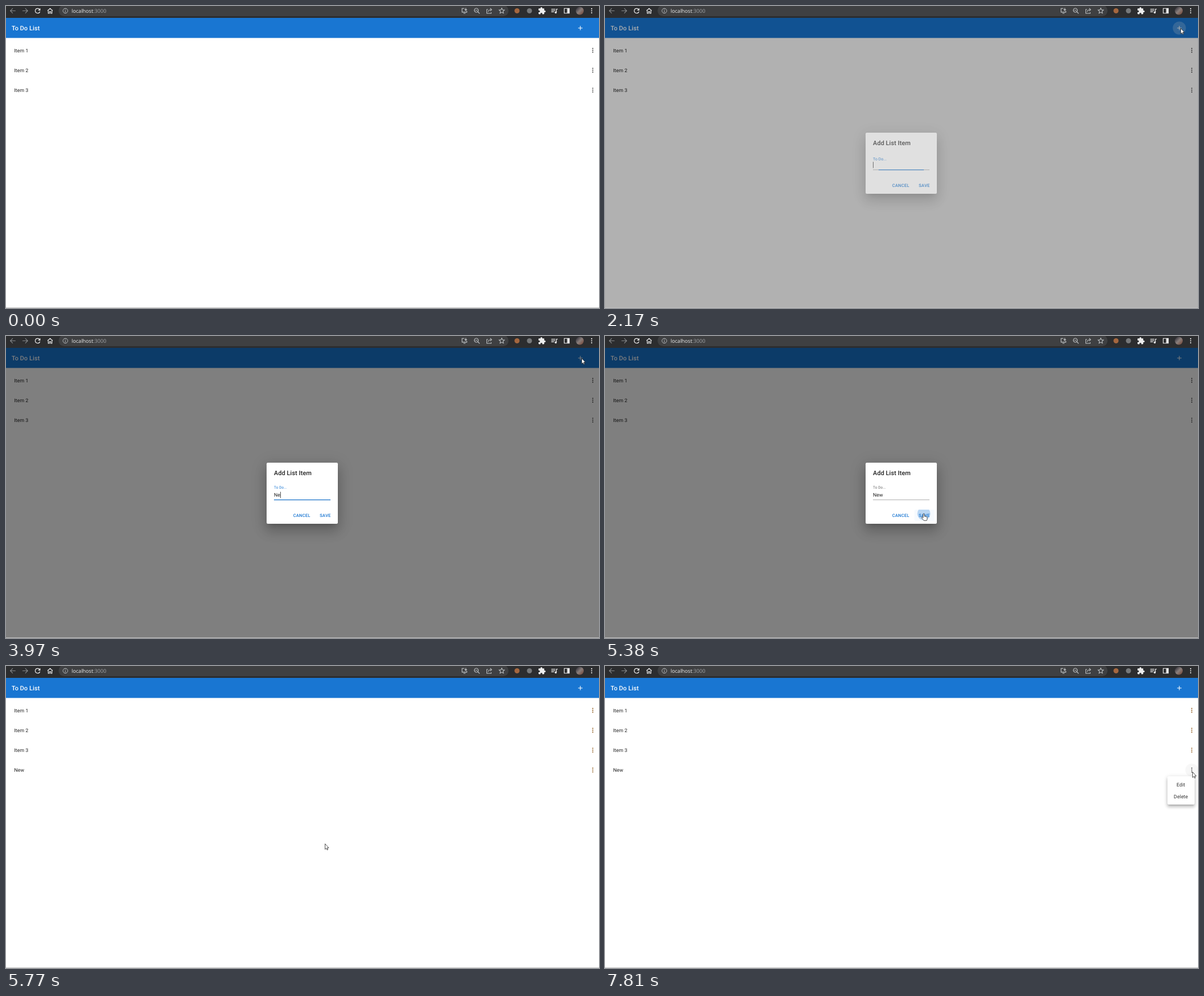
Recreate the animation shown at these times as an HTML page. Size 1049 by 534 pixels, loop 7.99 s.

```html
<!DOCTYPE html>
<html lang="en">
<head>
<meta charset="utf-8">
<title>To Do List</title>
<style>
html, body { margin: 0; width: 100%; height: 100%; overflow: hidden; background: #fff; }
body > * { position: absolute; }
svg { display: block; left: 0; top: 0; overflow: visible; }
text { font-family: Roboto, sans-serif; font-size: 8.8px; letter-spacing: .009em; fill: #212121; text-rendering: geometricPrecision; }
.title { font-size: 11px; font-weight: 500; letter-spacing: .0075em; }
.button { font-size: 7.7px; font-weight: 500; letter-spacing: .0286em; fill: #1976d2; }
.address { font: 9.1px "Open Sans", sans-serif; letter-spacing: 0; fill: #eee; }
#backdrop { left: 0; top: 21px; width: 1049px; height: 512px; background: #000; }
#dialog, #menu { background: #fff; border-radius: 2.2px; }
#dialog {
  left: 461px; top: 223.5px; width: 126px; height: 108px;
  box-shadow: 0 6px 8.3px -3.9px #0003, 0 13.2px 21px 1.7px #00000024, 0 5px 25.3px 4.4px #0000001f;
}
#menu {
  left: 995px; top: 195px; width: 47.5px; height: 49.5px; transform-origin: 100% 0;
  box-shadow: 0 2.75px 2.75px -1.65px #0003, 0 4.4px 5.5px .55px #00000024, 0 1.65px 7.7px 1.1px #0000001f;
}
#menu text { text-anchor: middle; fill: #333; }
</style>
</head>
<body>
<svg id="page" width="1049" height="534">
  <defs>
    <linearGradient id="avatar" x2="1" y2="1">
      <stop stop-color="#1c1e2a"/><stop offset=".5" stop-color="#8b807d"/><stop offset="1" stop-color="#74402f"/>
    </linearGradient>
    <clipPath id="saveArea"><rect x="547.4" y="306.5" width="35.2" height="20" rx="2.2"/></clipPath>
  </defs>
  <rect width="1049" height="21" fill="#2c2d2f"/>
  <rect x="93" y="-1.5" width="796" height="19.5" rx="9.7" fill="#3f4042"/>
  <g id="icons"></g>
  <text class="address" x="116" y="12">localhost<tspan fill="#a0a3a6">:3000</tspan></text>
  <circle cx="904" cy="8.5" r="4.5" fill="#a5673f"/>
  <circle cx="926" cy="8.5" r="4.5" fill="#77797b"/>
  <circle cx="1015" cy="8.5" r="7" fill="url(#avatar)"/>
  <rect y="21" width="1049" height="35.5" fill="#1976d2"/>
  <text class="title" x="10" y="43" style="fill:#fff">To Do List</text>
  <circle id="addRipple"/>
  <path d="M1012.15 39h7.7M1016 35.15v7.7" stroke="#fff" stroke-width="1.1"/>
  <g id="list"></g>
  <rect y="533" width="1049" height="1" fill="#c0c0c0"/>
</svg>

<div id="backdrop"></div>

<div id="dialog">
  <svg viewBox="461 223.5 126 108" width="126" height="108">
    <text class="title" x="474" y="245">Add List Item</text>
    <text id="label" x="474">To Do...</text>
    <text id="typed" x="474" y="283.5"></text>
    <rect id="caret" y="275" width="1" height="11" fill="#444"/>
    <rect x="474" y="289" width="100" height=".6" fill="#777"/>
    <rect id="focusLine" y="288.6" height="1.2" fill="#1976d2"/>
    <g id="saveRipple" clip-path="url(#saveArea)" fill="#1976d2">
      <rect x="547" y="306" width="36" height="21" opacity=".04"/>
      <circle id="savePress" cx="564" cy="313.5" r="11.5" opacity=".28"/>
    </g>
    <text class="button" x="508" y="319.3">CANCEL</text>
    <text class="button" x="555" y="319.3">SAVE</text>
  </svg>
</div>

<div id="menu">
  <svg viewBox="995 195 47.5 49.5" width="47.5" height="49.5">
    <text x="1018.7" y="213.3">Edit</text>
    <text x="1018.7" y="233.7">Delete</text>
  </svg>
</div>

<svg width="1049" height="534">
  <g id="cursor" fill="#fff" stroke="#222" stroke-width=".8" stroke-linejoin="round">
    <path id="arrow" d="M.4.4V10.2L2.6 8.2 4 11.3 5.5 10.6 4.1 7.6H7Z"/>
    <path id="hand" d="M-1.2 7.5V1.2a1.1 1.1 0 0 1 2.2 0V5q1-.6 1.7.2 1-.5 1.7.4 1.5-.3 1.5 1.1v2.7q0 1.5-.9 2.9H.1q-1.5-1.6-3.9-4.7-.6-1.2.5-1.4 1 0 2.1 1.3z"/>
  </g>
</svg>

<script>
const LOOP = 7990;
const el = id => document.getElementById(id);
const show = (id, on) => { el(id).style.display = on ? '' : 'none'; };
const set = (id, attrs) => { for (const k in attrs) el(id).setAttribute(k, attrs[k]); };
const between = (t, a, b) => t >= a && t < b;

// Toolbar icons, drawn on a 24-unit grid: x centre, path, colour, stroke width (0 = filled)
const icons = [
  [12, 'M20 12H5M12 4.7L4.7 12l7.3 7.3', '#85888a', 2],
  [34, 'M4 12h15M12 4.7l7.3 7.3-7.3 7.3', '#85888a', 2],
  [56, 'M17.65 6.35A7.96 7.96 0 0 0 12 4a8 8 0 1 0 7.73 10h-2.08A6 6 0 1 1 12 6c1.66 0 3.14.69 4.22 1.78L13 11h7V4z', '#eee', 0],
  [78, 'M4.5 11.5L12 5l7.5 6.5M6.5 10v9.5h3.7V14h3.6v5.5h3.7V10', '#eee', 1.9],
  [105, 'M12 5a7 7 0 1 0 .01 0zM12 11v5M12 8v1.7', '#c4c7c9', 1.6],
  [811, 'M12 5H5v11h14v-3M9 19.5h6M16 3.5v7M12.7 7.8l3.3 3.3 3.3-3.3', '#c4c7c9', 1.9],
  [833, 'M10.3 4.5a5.8 5.8 0 1 0 .01 0zM14.5 14.5l5.5 5.5M7.7 10.3h5.2', '#c4c7c9', 1.8],
  [855, 'M8 8H4.5v11.5h13V16M8.5 15q1-6 8-6.5M14.5 4.5l4.5 4-4.5 4', '#c4c7c9', 1.7],
  [877, 'M12 4l2.4 5.2 5.6.6-4.2 3.8 1.2 5.6-5-2.9-5 2.9 1.2-5.6L4 9.8l5.6-.6z', '#c4c7c9', 1.7],
  [948, 'M20.5 11H19V7c0-1.1-.9-2-2-2h-4V3.5a2.5 2.5 0 0 0-5 0V5H4c-1.1 0-2 .9-2 2v3.8h1.5a2.7 2.7 0 0 1 0 5.4H2V20c0 1.1.9 2 2 2h3.8v-1.5a2.7 2.7 0 0 1 5.4 0V22H17c1.1 0 2-.9 2-2v-4h1.5a2.5 2.5 0 0 0 0-5z', '#eee', 0],
  [970, 'M15 6H3v2h12zm0 4H3v2h12zM3 16h8v-2H3zM17 6v8.18A3 3 0 1 0 19 17V8h3V6z', '#eee', 0],
  [992, 'M4.5 5h15v14h-15zM14 5h5.5v14H14zM16 5v14M18 5v14', '#eee', 1.9],
];
el('icons').innerHTML = icons.map(([x, d, color, width]) =>
  `<path transform="translate(${x - 7.2} 1.3) scale(.6)" d="${d}" ` +
  (width ? `fill="none" stroke="${color}" stroke-width="${width}"/>` : `fill="${color}"/>`)
).join('') + dots(1036, 8.5, 3.6, '#eee');

function dots(x, y, gap, color) {
  return `<g fill="${color}">` +
    [-gap, 0, gap].map(dy => `<circle cx="${x}" cy="${y + dy}" r="1.1"/>`).join('') + '</g>';
}

el('list').innerHTML = ['Item 1', 'Item 2', 'Item 3', 'New'].map((name, i) => {
  const y = 78.4 + 35.2 * i;
  return `<g id="row${i}"><circle id="more${i}" cx="1038" cy="${y}" r="11.5" opacity="0"/>` +
    `<text x="14.4" y="${y + 3.1}">${name}</text>${dots(1038, y, 3.3, 'currentColor')}</g>`;
}).join('');

// The picture advances in steps of about a fifth of a second
const steps = (start, size, count) => Array.from({ length: count }, (_, i) => start + i * size);
const stamps = [0, ...steps(370, 200, 21), ...steps(4590, 197.5, 6), ...steps(5770, 200, 6), ...steps(6970, 210, 5)];
const snap = t => stamps.findLast(s => s <= t);

// Pointer path: time, x, y
const path = [
  [370, 680, 283], [1370, 1018, 43], [1570, 1018, 39], [4390, 1018, 39],
  [5182, 564, 314], [5770, 564, 314], [6370, 793, 208], [6770, 1030, 191], [6970, 1039, 187],
];
function pointer(t) {
  const i = path.findIndex(p => p[0] > t);
  if (i < 0) return path.at(-1).slice(1);
  if (i === 0) return path[0].slice(1);
  const [a, b] = [path[i - 1], path[i]];
  const k = (t - a[0]) / (b[0] - a[0]);
  const e = k * k * (3 - 2 * k);
  return [a[1] + (b[1] - a[1]) * e, a[2] + (b[2] - a[2]) * e];
}

function drawDialog(t) {
  const opening = between(t, 2170, 2370), closing = between(t, 5570, 5770);
  const opacity = !between(t, 2170, 5770) ? 0 : opening ? .61 : closing ? .35 : 1;
  const focused = t < 5380;
  el('backdrop').style.opacity = opacity / 2;
  el('dialog').style.opacity = opacity;

  el('label').style.fontSize = opening ? '7px' : '6.6px';
  el('label').style.fill = focused ? '#1976d2' : '#666';
  set('label', { y: opening ? 272 : 269.3 });
  set('focusLine', { x: opening ? 484 : 474, width: focused ? (opening ? 80 : 100) : 0 });

  const letters = t < 3770 ? 0 : Math.min(3, 1 + Math.floor((t - 3770) / 200));
  el('typed').textContent = 'New'.slice(0, letters);
  set('caret', { x: 474 + (letters && el('typed').getComputedTextLength()) });
  show('caret', focused && !between(t, 2770, 3170) && !between(t, 4590, 5180));
  show('saveRipple', t >= 5180);
  show('savePress', t >= 5380);
}

function drawPage(t) {
  const pressed = between(t, 1970, 2170);
  set('addRipple', {
    cx: pressed ? 1017.5 : 1016, cy: 39, r: pressed ? 8.6 : 11.6,
    fill: pressed ? '#80b35c' : '#fff',
    opacity: pressed ? 1 : between(t, 2170, 2370) ? .22 : between(t, 2370, 2570) ? .03 : 0,
  });
  show('row3', t >= 5570);
  for (let i = 0; i < 4; i++) {
    const brown = t >= 5570 && !(i === 3 && t >= 6970);
    el('row' + i).style.color = brown ? '#a0743f' : '#606060';
  }
  set('more3', { opacity: t < 6970 ? 0 : between(t, 7390, 7600) ? .14 : .03 });
  const menu = el('menu').style;
  menu.opacity = t >= 7810 ? 1 : t >= 7590 ? .6 : 0;
  menu.transform = t >= 7810 ? '' : 'scale(.93, .87)';
}

function drawCursor(t) {
  const hand = between(t, 1370, 2170) || between(t, 5180, 5770) || between(t, 6970, 7590);
  show('cursor', t >= 370);
  show('hand', hand);
  show('arrow', !hand);
  set('cursor', { transform: `translate(${pointer(t).map(Math.round)})` });
}

function frame() {
  const t = snap(performance.now() % LOOP);
  drawPage(t);
  drawDialog(t);
  drawCursor(t);
  requestAnimationFrame(frame);
}
frame();
</script>
</body>
</html>
```
